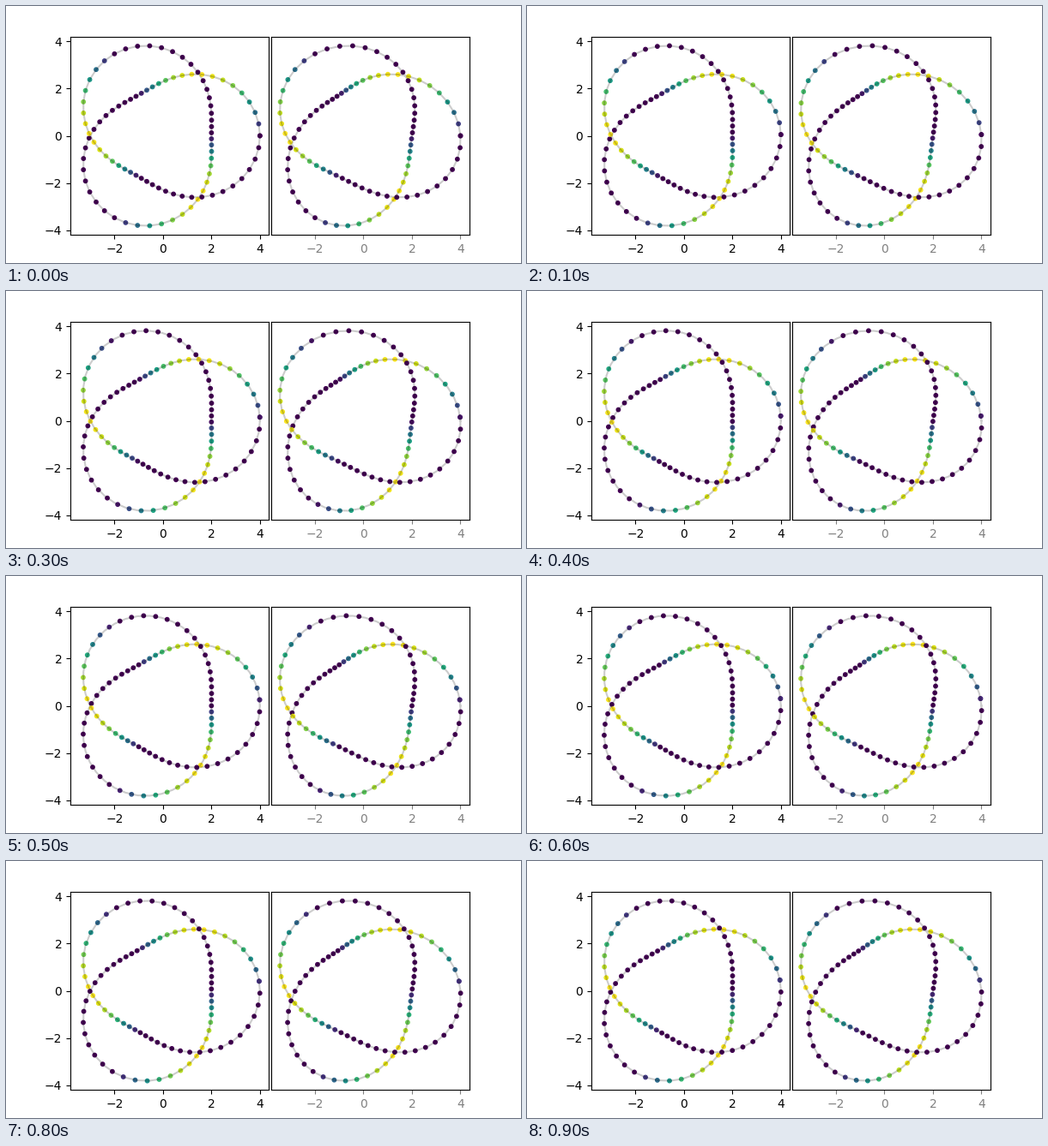
Animation, 600 px wide and 300 px high, one loop 1000 ms. Source, as a matplotlib script:

```python
import matplotlib.pyplot as plt
import numpy as np
from matplotlib.animation import FuncAnimation

FRAMES = 10
POINTS = 100
EYE_SPACING, VIEW_DISTANCE = 65, 350

t = np.linspace(0, 2 * np.pi, POINTS)
step = t[1] - t[0]


def trefoil(t):
    r = 3 + np.cos(3 * t)
    return r * np.cos(2 * t), r * np.sin(2 * t), np.sin(3 * t)


def stereo_pair(x, z):
    """Horizontal positions for the left and the right eye."""
    return x, x - EYE_SPACING * z / (VIEW_DISTANCE + z)


fig, axes = plt.subplots(1, 2, figsize=(6, 3), dpi=100, sharex=True, sharey=True)
fig.subplots_adjust(left=0.125, right=0.9, bottom=0.11, top=0.88, wspace=0.01)
axes[1].tick_params(axis="x", colors="gray")
axes[1].tick_params(axis="y", left=False, labelleft=False)

x, y, z = trefoil(t)
dots = []
for ax, eye_x in zip(axes, stereo_pair(x, z)):
    ax.plot(eye_x, y, color="black", alpha=0.2)
    dots.append(ax.scatter(eye_x, y, c=z, s=10, cmap="viridis", vmin=0, vmax=1))


def update(frame):
    # One loop carries every dot to its neighbour's starting place.
    x, y, z = trefoil(t + step * frame / FRAMES)
    for scatter, eye_x in zip(dots, stereo_pair(x, z)):
        scatter.set_offsets(np.column_stack([eye_x, y]))
        scatter.set_array(z)
    return dots


animation = FuncAnimation(fig, update, frames=FRAMES, interval=100, repeat=True)
plt.show()
```
